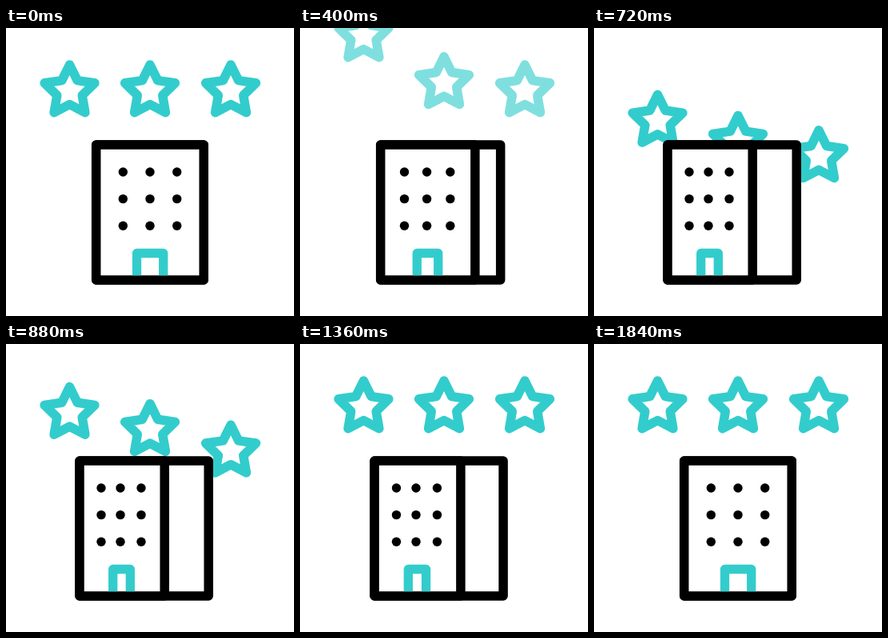
An HTML page with a canvas for the animation above (2 s loop, 360 px wide and 360 px high).

```html
<!DOCTYPE html>
<html lang="en">
<head>
<meta charset="utf-8">
<title>Three-star hotel</title>
<style>
  html, body { margin: 0; width: 100%; height: 100%; overflow: hidden; background: #fff; }
  canvas { display: block; width: 360px; height: 360px; }
</style>
</head>
<body>
<canvas id="stage" width="360" height="360"></canvas>
<script>
const ctx = document.getElementById('stage').getContext('2d');
const LOOP = 2000, STEP = 40;
const TEAL = '#33cccc', BLACK = '#000', WHITE = '#fff';
const STAR_X = [79.5, 180, 281], STAR_Y = 79;
const LEAVE_DELAY = [0, 160, 270], RISE_LEAD = [240, 120, 0];

const clamp = v => Math.min(1, Math.max(0, v));
const span = (t, from, to) => clamp((t - from) / (to - from));
const lerp = (a, b, p) => a + (b - a) * p;
const easeInOut = u => (1 - Math.cos(Math.PI * u)) / 2;
const easeTurn = u => lerp(easeInOut(u), Math.sin(Math.PI * u / 2), 0.38);

function strokePath(color, width, trace) {
  ctx.strokeStyle = color;
  ctx.lineWidth = width;
  ctx.beginPath();
  trace();
  ctx.stroke();
}

function drawStar(x, y) {
  strokePath(TEAL, 11.5, () => {
    for (let i = 0; i < 10; i++) {
      const r = i % 2 ? 16.5 : 33;
      const a = (i / 5 - 0.5) * Math.PI;
      ctx.lineTo(x + r * Math.cos(a), y + r * Math.sin(a));
    }
    ctx.closePath();
  });
}

function drawStars(t) {
  const leaving = t < 720;
  ctx.globalAlpha = leaving ? 1 - span(t, 160, 800) : 1;
  STAR_X.forEach((x, i) => {
    const leave = Math.max(0, t - 140 - LEAVE_DELAY[i]) / 260;
    const rise = easeInOut(span(t + RISE_LEAD[i], 635, 1235));
    drawStar(x, STAR_Y + (leaving ? -69 * leave * leave : 86 * (1 - rise)));
  });
  ctx.globalAlpha = 1;
}

function drawWall(left, right) {
  const top = 146, height = 169;
  ctx.fillStyle = WHITE;
  ctx.fillRect(left, top, right - left, height);
  strokePath(BLACK, 11.5, () => ctx.rect(left, top, right - left, height));
}

function drawBuilding(t) {
  const back = easeTurn(span(t, 1320, 1840));
  const turn = t < 1320 ? easeTurn(span(t, 120, 680)) : 1 - back;
  const left = lerp(112.7, 92, turn);
  const sway = 23 * back * (1 - back);

  drawWall(left, lerp(247.2, 253.2, turn) + sway);
  drawWall(left, lerp(247.2, 198.2, turn));

  ctx.fillStyle = BLACK;
  for (const [flat, turned] of [[146.3, 119], [180, 143], [213.7, 169]]) {
    for (let row = 0; row < 3; row++) {
      ctx.beginPath();
      ctx.arc(lerp(flat, turned, turn), 180 + 33.6 * row, 5.7, 0, 2 * Math.PI);
      ctx.fill();
    }
  }

  const doorLeft = lerp(163.5, 133.7, turn);
  const doorRight = lerp(196.7, 155.3, turn);
  ctx.lineCap = 'butt';
  strokePath(TEAL, 11.3, () => {
    ctx.moveTo(doorLeft, 309.3);
    ctx.lineTo(doorLeft, 281.5);
    ctx.lineTo(doorRight, 281.5);
    ctx.lineTo(doorRight, 309.3);
  });
}

function draw(now) {
  const t = Math.floor((now % LOOP) / STEP) * STEP;
  ctx.fillStyle = WHITE;
  ctx.fillRect(0, 0, 360, 360);
  drawStars(t);
  drawBuilding(t);
}

ctx.lineJoin = 'round';
const start = performance.now();
function tick() {
  draw(performance.now() - start);
  requestAnimationFrame(tick);
}
tick();
</script>
</body>
</html>
```
